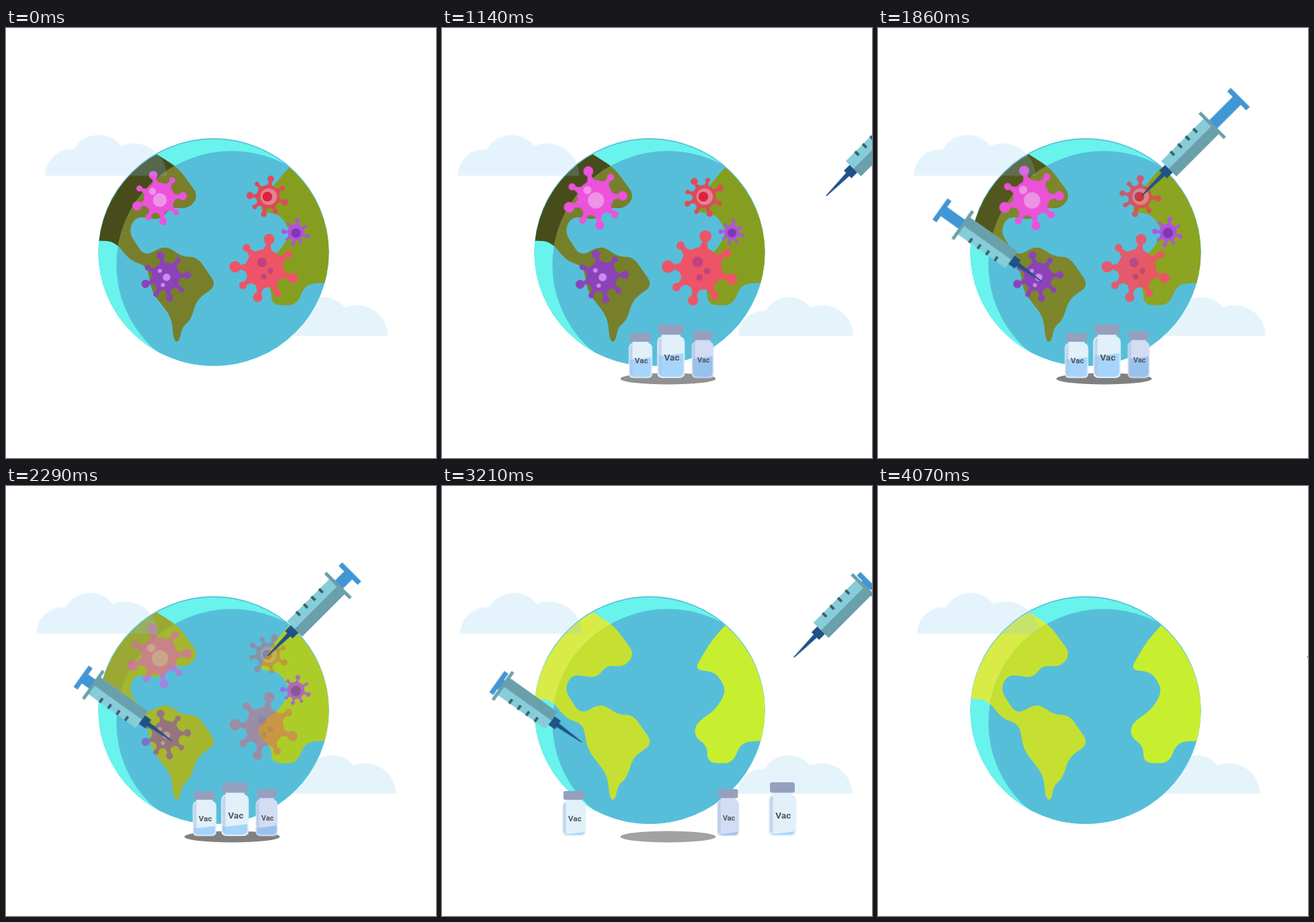
Write an HTML page that moves like this. It is 640 px wide and 640 px high and loops after 4.37 s.

```html
<!DOCTYPE html>
<html lang="en">
<head>
<meta charset="utf-8">
<title>Vaccinated globe</title>
<style>
  html, body { margin: 0; width: 100%; height: 100%; overflow: hidden; background: #fff; }
  svg { display: block; width: 100vw; height: 100vh; }
  text { font-family: Roboto, Arial, sans-serif; font-weight: 700; fill: #55575e; text-anchor: middle; }
</style>
</head>
<body>
<svg viewBox="0 0 640 640">
  <defs>
    <path id="cloud" d="M0 60.5A40 40 0 0 1 43 21A43 43 0 0 1 114 16A48.5 48.5 0 0 1 181 60.5Z"/>
    <ellipse id="disc" cx="309" cy="333.5" rx="171.7" ry="169.5"/>
    <path id="west"/>
    <clipPath id="globe"><use href="#disc"/></clipPath>
    <clipPath id="face"><use href="#disc" y="1.8"/></clipPath>
    <clipPath id="lit"><use href="#disc" x="27" y="19"/></clipPath>
    <clipPath id="glass"><rect x="-18.5" y="-60" width="37" height="58" rx="7"/></clipPath>
    <g id="germ"/>
    <g id="barrel">
      <path d="M0 -.7L47 -3.5V3.5L0 .7Z" fill="#1f5286"/>
      <rect x="45" y="-8" width="13" height="16" fill="#1f5286"/>
      <rect x="57" y="-16" width="91" height="32" fill="#86cdd9"/>
      <rect x="57" width="91" height="16" fill="#69a0ab"/>
      <path d="M75 -12.5H127" stroke="#36616c" stroke-width="8" stroke-dasharray="4 12"/>
      <rect x="146" y="-26.5" width="5" height="53" fill="#69a0ab"/>
    </g>
    <path id="plunger" d="M110 -8.5H200V-20H207.5V20H200V8.5H110Z" fill="#4196d4"/>
  </defs>

  <g transform="translate(397 401) scale(.945)" fill="#e5f4fb"><use id="cloudRight" href="#cloud"/></g>

  <use href="#disc" fill="#57bed9"/>
  <g clip-path="url(#globe)"><g clip-path="url(#face)">
    <rect width="640" height="640" fill="#68f3ed"/>
    <use id="westShade" href="#west"/>
    <g clip-path="url(#lit)">
      <rect width="640" height="640" fill="#57bed9"/>
      <use id="westLit" href="#west"/>
      <path id="east"/>
    </g>
  </g></g>

  <g transform="translate(228 253)"><g id="pink" fill="#ee94e8">
    <use href="#germ" fill="#ec52dc" transform="rotate(-23) scale(.8)"/>
    <circle cx="1" cy="3" r="10.3"/><circle cx="-10" cy="-10" r="5.2"/>
  </g></g>
  <g transform="translate(238 370)"><g id="violet" fill="#cb8cee">
    <use href="#germ" fill="#8c42b8" transform="rotate(-23) scale(.73)"/>
    <circle cx="1" cy="1" r="5.6"/><circle cx="-9" cy="-8.5" r="3"/><circle cx="-4.5" cy="12.5" r="3"/>
  </g></g>
  <g transform="translate(390 251)"><g id="crimson">
    <g id="crimsonSpin"><use href="#germ" fill="#de4a58" transform="scale(.61)"/></g>
    <circle cx="1" r="12.3" fill="#e28390"/><circle cx="-1" r="7.3" fill="#dd2240"/>
  </g></g>
  <g transform="translate(431.5 304)"><g id="lilac">
    <use href="#germ" fill="#b052e4" transform="scale(.41)"/>
    <circle cy="1" r="7" fill="#8038b0"/>
  </g></g>
  <g transform="translate(385 358)"><g id="coral" fill="#bf437f">
    <use href="#germ" fill="#ee5467"/>
    <circle cx="-4" cy="-9" r="7.1"/><circle cx="8.5" cy="3.5" r="4.3"/><circle cx="-1.5" cy="12" r="4.3"/>
  </g></g>

  <g transform="translate(58 159.5)" fill="#89c8f6" fill-opacity=".22"><use id="cloudLeft" href="#cloud"/></g>
  <ellipse id="shadow" cx="336.5" cy="522" rx="71" ry="8.5" fill="#808080"/>
  <g id="vials"></g>

  <g id="syringeRight"><g transform="translate(392.5 249.8) rotate(-45)">
    <g id="pushRight"><use id="plungerRight" href="#plunger"/><use href="#barrel"/></g>
  </g></g>
  <g id="syringeLeft"><g transform="translate(243.5 377) rotate(215.5) scale(.97)">
    <g id="pushLeft"><use id="plungerLeft" href="#plunger"/><use href="#barrel"/></g>
  </g></g>
</svg>

<script>
const LOOP = 4370;
const el = id => document.getElementById(id);

// Track of [ms, value] stops, held before the first and after the last.
function track(id, prop, stops, easing = 'linear') {
  const all = [[0, stops[0][1]], ...stops, [LOOP, stops.at(-1)[1]]];
  el(id).animate(all.map(([ms, value]) => ({ offset: ms / LOOP, [prop]: value, easing })),
    { duration: LOOP, iterations: Infinity });
}
const move = (id, ...stops) =>
  track(id, 'transform', stops.map(([ms, x, y = 0]) => [ms, `translate(${x}px, ${y}px)`]));

// Closed outline through "x,y x,y ..." with every corner rounded.
function rounded(text, radius = 14) {
  const points = text.split(' ').map(p => p.split(',').map(Number));
  const toward = ([x, y], [u, v]) => {
    const k = Math.min(.5, radius / Math.hypot(u - x, v - y));
    return [x + (u - x) * k, y + (v - y) * k];
  };
  return 'M' + points.map((p, i) => {
    const next = points[(i + 1) % points.length];
    return `${toward(p, points.at(i - 1))}Q${p} ${toward(p, next)}`;
  }).join('L') + 'Z';
}
el('west').setAttribute('d', rounded('110,115 256,208 287,250 271,270 245,266 231,286 193,280 182,303 206,340 238,323 262,341 284,340 314,383 284,404 275,435 262,445 258,467 250,467 246,430 217,393 210,354 186,347 162,318 137,316 110,320'));
el('east').setAttribute('d', rounded('440,187 401,230 375,274 407,276 424,304 408,332 377,354 376,374 395,386 395,412 432,413 446,381 480,379 520,379 520,187'));

// Eight knobs, large and small in turn, slightly unevenly spread.
el('germ').innerHTML = '<circle r="28.5"/>' + Array.from({ length: 8 }, (_, i) => {
  const small = i % 2;
  const angle = 191 + 45 * i + 8 * Math.sin((i - 2.4) * Math.PI / 4);
  const reach = small ? 41 : 44;
  return `<g transform="rotate(${angle})"><path d="M25 -9Q29 -3 ${reach} -2.7V2.7Q29 3 25 9Z"/>
    <circle cx="${reach}" r="${small ? 5.6 : 8.5 - i / 4}"/></g>`;
}).join('');

// Each virus swells from its first size to a peak, settles, then dissolves.
function virus(id, fadeAt, ...sizes) {
  track(id, 'transform', [[0, 1], ...sizes].map(([ms, s]) => [ms, `scale(${s})`]), 'ease-in-out');
  track(id, 'opacity', [[fadeAt, 1], [fadeAt + 900, 0]]);
}
virus('crimson', 1740, [LOOP, 1]);
virus('coral', 1800, [850, 1.13], [1800, 1]);
virus('pink', 1850, [1500, 1.19]);
virus('violet', 1900, [850, 1.08], [2200, 1]);
virus('lilac', 2100, [640, .84], [1860, 1.08]);
track('crimsonSpin', 'transform', [[0, 'rotate(0deg)'], [LOOP, 'rotate(205deg)']]);

const HEAL = [1800, 2650], INJECT = [1860, 2540];
function vial(id, x, width, height, glass, liquid, enter, arrive, leave, exit) {
  el('vials').insertAdjacentHTML('beforeend', `<g id="${id}"><g transform="translate(${x} 521)">
    <g transform="scale(${width / 41} ${height / 80})">
      <path d="M-14 -66V-62Q-20.5 -60 -20.5 -53V-8Q-20.5 0 -12 0H12Q20.5 0 20.5 -8V-53Q20.5 -60 14 -62V-66Z" fill="${glass}"/>
      <g clip-path="url(#glass)"><path id="${id}Fill" d="M-19 -33Q0 -34 19 -37V10H-19Z" fill="${liquid}"/></g>
      <path d="M-14 -60V-4Q-19 -5 -19 -10V-52Q-19 -58 -14 -60Z" fill="#aebfe0" opacity=".55"/>
      <rect x="-18.5" y="-80" width="37" height="15.5" rx="3.5" fill="#95a0be"/>
    </g>
    <text x="1.2" y="${-height * .325}" font-size="${width / 3}">Vac</text></g></g>`);
  move(id, enter, [arrive, 0], [leave, 0], [leave + 410, exit]);
  move(id + 'Fill', [INJECT[0], 0], [INJECT[1], 0, 30]);
}
vial('vialLeft', 295.5, 35, 67, '#e1f0f9', '#a6d4fb', [640, -365], 890, 3088, -330);
vial('vialRight', 388, 32.5, 70, '#d2ddf4', '#98c2ee', [500, 305], 710, 3164, 330);
vial('vialMiddle', 340.8, 41, 80, '#e1f0f9', '#a6d4fb', [0, -250, 199], 710, 3005, 330);
track('shadow', 'opacity', [[900, 0], [1180, 1], [3130, 1], [3430, 0]]);

// Two there-and-back drifts, each leg lasting the given time.
const drift = (id, distance, leg) =>
  move(id, ...Array.from({ length: 5 }, (_, i) => [i * leg, i % 2 * distance]));
drift('cloudLeft', -41, 990);
drift('cloudRight', 53, 1020);

const heal = (id, sick, healthy) => track(id, 'fill', [[HEAL[0], sick], [HEAL[1], healthy]]);
heal('westShade', '#484c1b', '#d8eb46');
heal('westLit', '#777f2b', '#c5e031');
heal('east', '#869e20', '#c8ef2f');

function syringe(side, enter, leave, distance, drawn) {
  move('syringe' + side, [enter, distance], [enter + 490, 0], [leave, 0], [leave + 500, distance]);
  move('push' + side, [INJECT[0], 0], [INJECT[1], -7.5]);
  move('plunger' + side, [INJECT[0], drawn], [INJECT[1], -47.5]);
}
syringe('Right', 1000, 2940, 252, 0);
syringe('Left', 1210, 3130, -256, -16);
</script>
</body>
</html>
```
